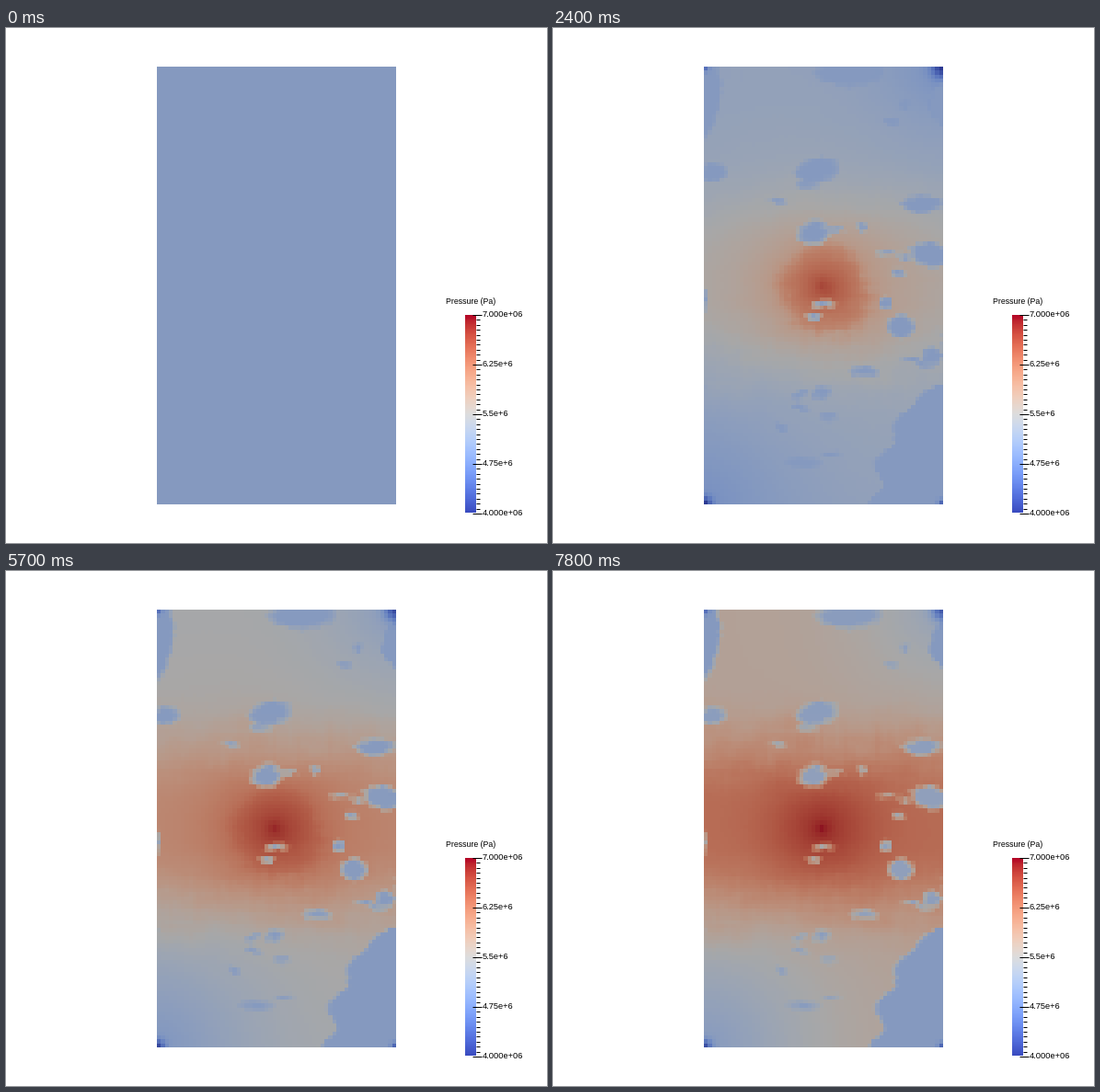
Animation of 588 by 560 pixels, one loop 8 s. Source, as a matplotlib script:

```python
import matplotlib.pyplot as plt
import numpy as np
from matplotlib.animation import FuncAnimation

WIDTH, HEIGHT, DPI = 588, 560, 100
LEFT, RIGHT, TOP, BOTTOM = 164, 424, 42, 518
COLS, ROWS = 60, 110
STEPS, TICKS_PER_STEP = 27, 3
START = 0.35      # initial pressure as a fraction of the colour range
SHADE = 0.76      # lighting on the reservoir surface
WELL_X, WELL_Y = 292, 280

plt.rcParams["font.family"] = "Liberation Sans"
cmap = plt.get_cmap("coolwarm")
rng = np.random.default_rng(7)

X, Y = np.meshgrid(
    LEFT + (np.arange(COLS) + 0.5) * (RIGHT - LEFT) / COLS,
    TOP + (np.arange(ROWS) + 0.5) * (BOTTOM - TOP) / ROWS)


def bell(distance, width, power=2):
    return np.exp(-np.abs(distance / width) ** power)


def distance_to(x, y):
    return np.hypot(X - x, Y - y)


def smooth_noise(height, width):
    """Unit-variance noise averaged over a height x width window."""
    raw = rng.normal(size=(ROWS + height - 1, COLS + width - 1))
    out = sum(raw[i:i + ROWS, j:j + COLS]
              for i in range(height) for j in range(width))
    return out / out.std()


ripple = smooth_noise(3, 5)
drift = smooth_noise(9, 13)
warped_x = X + 2.5 * drift
warped_y = Y + 1.5 * ripple


def patch_depth(cx, cy, rx, ry):
    """Distance in pixels inside the rim of a ragged ellipse."""
    radius = np.hypot((warped_x - cx) / rx, (warped_y - cy) / ry)
    return (1 - radius) * min(rx, ry)


# Tight rock that barely takes up pressure: centre x, centre y, radii
patches = [
    (322, 48, 33, 14), (176, 157, 13, 10), (290, 155, 18, 12), (405, 191, 19, 8),
    (280, 224, 15, 10), (408, 247, 18, 12), (379, 324, 14, 11), (362, 298, 6, 6),
    (416, 355, 9, 8), (337, 374, 12, 5), (292, 398, 9, 6), (270, 472, 14, 4),
]
# Thin streaks, thickest towards the east flank
for _ in range(22):
    patches.append((rng.triangular(190, 385, 420), rng.uniform(70, 500),
                    rng.uniform(3, 8), rng.uniform(2, 3.5)))
patch_field = np.max([patch_depth(*patch) for patch in patches], axis=0)

# Tight zones along the edges of the rectangle
slope = np.sqrt(np.clip((Y - 386) / 92, 0, 1))
south_east = warped_x - (430 - 78 * slope + 6 * slope * np.sin(Y / 7))
north_west = 160 + 25 * bell(Y - 72, 35) - warped_x
north_east = warped_x - (429 - 17 * bell(Y - 84, 25))
edge_field = np.max([south_east, north_west, north_east], axis=0)

tightness = np.maximum(0.9 * np.clip(patch_field / 6 + 0.5, 0, 1),
                       np.clip(edge_field / 6 + 0.5, 0, 1))

# Pressure gain reached at the last step
to_north_east = distance_to(RIGHT, TOP)
to_south_west = distance_to(LEFT, BOTTOM)
to_well = distance_to(WELL_X, WELL_Y)
band = Y + 5 * drift + 2 * ripple - WELL_Y
gain = (0.21 + 0.22 * bell(band, 97, 3)
        - 0.13 * bell(to_south_west, 130) - 0.06 * bell(to_north_east, 100)
        + 0.13 * bell(to_well, 60) + 0.09 * bell(to_well, 9, 1))

# Rock near the well responds at once, remote rock late
reach = distance_to(WELL_X + 8, WELL_Y + 6)
reach = reach + (4 * drift + 2 * ripple) * np.clip(reach / 40, 0, 1)
delay = 0.12 + 0.0032 * reach + 0.22 / (1 + np.exp((48 - reach) / 3))

# Producers in the four corners
drawdown = 0.10 * bell(to_north_east, 48, 1) + 0.08 * bell(to_south_west, 70, 1)
sinks = (0.32 * bell(to_north_east, 12) + 0.33 * bell(to_south_west, 8)
         + 0.25 * bell(distance_to(LEFT, TOP), 5)
         + 0.30 * bell(distance_to(RIGHT, BOTTOM), 5))


def surface(step):
    time = step / (STEPS - 1)
    openness = (1 - tightness) ** (3 - 2 * time)
    onset = min(1, step / 2) ** 0.5
    pressure = (START + gain * time ** delay * openness
                - onset * (drawdown * (1 - tightness) + sinks))
    return cmap(np.clip(pressure, 0, 1))[..., :3] * SHADE


fig = plt.figure(figsize=(WIDTH / DPI, HEIGHT / DPI), dpi=DPI, facecolor="white")
ax = fig.add_axes([0, 0, 1, 1])
field = ax.imshow(surface(0), extent=(LEFT, RIGHT, BOTTOM, TOP),
                  interpolation="nearest", aspect="auto")

# Colour legend
BAR_TOP, BAR_BOTTOM = 311, 527
ax.imshow(np.linspace(1, 0, 256)[:, None], cmap=cmap, vmin=0, vmax=1,
          extent=(499, 511, BAR_BOTTOM, BAR_TOP + 1), aspect="auto")


def label(x, baseline, text, size):
    ax.text(x, baseline, text, fontsize=size * 72 / DPI, color="black")


label(478, 300, "Pressure (Pa)", 8.8)
tick_rows = np.linspace(BAR_TOP, BAR_BOTTOM, 41)
for i, row in enumerate(np.round(tick_rows)):
    start, end = (507, 517) if i % 10 == 0 else (511, 515)
    ax.plot([start, end], [row + 0.5] * 2, color="black", linewidth=0.72,
            solid_capstyle="butt")
names = ["7.000e+06", "6.25e+6", "5.5e+6", "4.75e+6", "4.000e+06"]
for row, name in zip(tick_rows[::10], names):
    label(517.5, row + 3.5, name, 9.3)

ax.set_xlim(0, WIDTH)
ax.set_ylim(HEIGHT, 0)
ax.axis("off")


def update(frame):
    field.set_data(surface(frame // TICKS_PER_STEP))
    return (field,)


anim = FuncAnimation(fig, update, frames=80, interval=100, repeat=True,
                     repeat_delay=0, blit=False)
plt.show()
```
